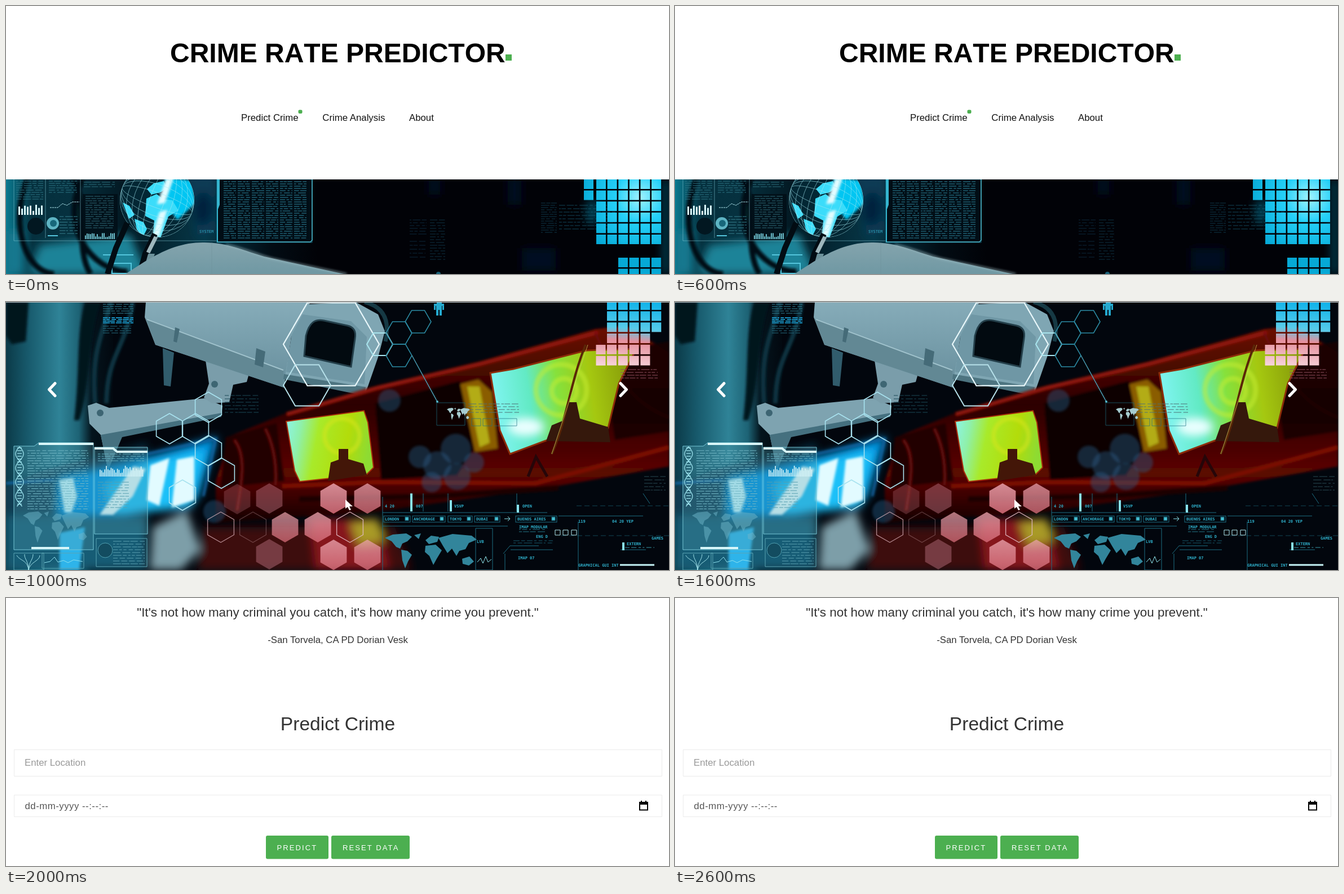
An HTML page that plays this animation: 1176 px wide and 476 px high, repeating every 3000 ms.

```html
<!DOCTYPE html>
<html lang="en">
<head>
<meta charset="utf-8">
<title>Crime Rate Predictor</title>
<style>
html, body { margin: 0; width: 100%; height: 100%; overflow: hidden; background: #fff; }
svg { display: block; width: 1176px; height: 476px; font-family: "Liberation Sans", Arial, sans-serif; }
.scene { display: none; }
.scene.on { display: inline; }
.title { font-size: 48px; font-weight: bold; font-kerning: none; }
.body { font-size: 16.8px; }
.mid { text-anchor: middle; }
.button { font-size: 13px; letter-spacing: 2.1px; fill: #fff; }
.hud { font: bold 7px "DejaVu Sans Mono", monospace; fill: #2fb0cb; }
</style>
</head>
<body>
<svg viewBox="0 0 1176 476">
<defs>
  <filter id="soft" x="-30%" y="-30%" width="160%" height="160%"><feGaussianBlur stdDeviation="2"/></filter>
  <filter id="blur" x="-50%" y="-50%" width="200%" height="200%"><feGaussianBlur stdDeviation="8"/></filter>
  <linearGradient id="wall">
    <stop offset="0" stop-color="#0b3a48"/><stop offset=".2" stop-color="#17596b"/>
    <stop offset=".5" stop-color="#2f8397"/><stop offset=".68" stop-color="#1d6375"/><stop offset=".8" stop-color="#04141d"/><stop offset="1" stop-color="#02080f"/>
  </linearGradient>
  <linearGradient id="room">
    <stop offset="0" stop-color="#0a7a90"/><stop offset=".04" stop-color="#05303e"/><stop offset=".1" stop-color="#06313f"/>
    <stop offset=".18" stop-color="#031822"/><stop offset=".3" stop-color="#063848"/><stop offset=".4" stop-color="#020c14"/><stop offset=".47" stop-color="#010207"/>
  </linearGradient>
  <linearGradient id="shell" x2="0" y2="1"><stop offset="0" stop-color="#86acb9"/><stop offset="1" stop-color="#678e9c"/></linearGradient>
  <linearGradient id="dome" x2="0" y2="1"><stop offset="0" stop-color="#84a4ad"/><stop offset="1" stop-color="#6f98a3"/></linearGradient>
  <linearGradient id="red" x2="0" y2="1">
    <stop offset="0" stop-color="#6d0d06"/><stop offset=".4" stop-color="#2c0303"/><stop offset=".75" stop-color="#5c0703"/><stop offset="1" stop-color="#140204"/>
  </linearGradient>
  <linearGradient id="lampA" y2=".15">
    <stop offset="0" stop-color="#8cf5ee"/><stop offset=".2" stop-color="#8ff0a8"/><stop offset=".4" stop-color="#a8ea2a"/><stop offset=".75" stop-color="#b3dc0a"/><stop offset="1" stop-color="#8edb32"/>
  </linearGradient>
  <linearGradient id="lampB" y2="-.1">
    <stop offset="0" stop-color="#7cf3ec"/><stop offset=".22" stop-color="#62eac4"/><stop offset=".42" stop-color="#86e13c"/><stop offset=".65" stop-color="#a5c810"/><stop offset="1" stop-color="#7f8f08"/>
  </linearGradient>
  <radialGradient id="glassTop" gradientUnits="userSpaceOnUse" cx="1125" cy="340" r="110">
    <stop offset="0" stop-color="#a0f3ff"/><stop offset=".4" stop-color="#25d0f8"/><stop offset="1" stop-color="#06a9d6"/>
  </radialGradient>
  <linearGradient id="glassLow" gradientUnits="userSpaceOnUse" x1="1100" y1="0" x2="1090" y2="114">
    <stop offset="0" stop-color="#12b4ea"/><stop offset=".4" stop-color="#57cbe9"/><stop offset=".6" stop-color="#e58f9c"/><stop offset="1" stop-color="#f6d3da"/>
  </linearGradient>
  <linearGradient id="pink" x2="0" y2="1"><stop offset="0" stop-color="#e9a3ad"/><stop offset="1" stop-color="#d96f7c"/></linearGradient>
  <clipPath id="strip"><rect y="308" width="1176" height="168"/></clipPath>
  <clipPath id="globeEdge"><circle cx="268" cy="345" r="66"/></clipPath>
  <path id="world" d="M0 8L14 2 38 0 48 6 40 14 31 18 27 27 20 24 12 14ZM29 29L40 31 48 38 41 50 36 62 31 48ZM52 3L64 0 60 10ZM72 12L82 4 96 6 93 15 78 19ZM72 22L90 20 101 30 92 45 86 56 79 40 71 33ZM95 8L120 1 154 4 163 11 149 17 143 28 132 31 127 40 119 27 111 35 103 22ZM137 45L150 41 158 50 149 57 138 54Z"/>
</defs>

<g class="scene on">
  <rect width="1176" height="476" fill="#fff"/>
  <text x="291" y="100" class="title">CRIME RATE PREDICTOR</text>
  <rect x="886" y="86" width="11" height="11" fill="#4caf50"/>
  <g class="body" fill="#111">
    <text x="417" y="204">Predict Crime</text><text x="561.3" y="204">Crime Analysis</text><text x="715" y="204">About</text>
  </g>
  <rect x="518.5" y="184.500" width="7" height="6.500" rx="2" fill="#4caf50"/>
  <g clip-path="url(#strip)">
    <rect y="308" width="1176" height="168" fill="url(#room)"/>
    <g filter="url(#blur)">
      <path d="M60 425L220 405 250 476H40Z" fill="#1b8398"/>
      <path d="M0 400H30V476H0Z" fill="#12788f"/>
      <path d="M320 300H372V400L340 410Z" fill="#083b55"/>
      <ellipse cx="350" cy="360" rx="16" ry="30" fill="#04213e"/>
      <path d="M750 305h20v30h-20ZM890 305h24v48h-24ZM915 430h60v40h-60Z" fill="#050c20"/>
      <path d="M1164 308h12v168h-12ZM1030 345h20v40h-20Z" fill="#064257"/>
    </g>
    <path d="M38 308C10 370 25 470 85 476M118 308C150 350 120 430 150 476M135 308C95 390 150 470 215 472" fill="none" stroke="#020c13" stroke-width="10" filter="url(#soft)"/>
    <rect x="136" y="334" width="62" height="82" fill="#020f17" opacity=".85"/>
    <g id="leftScreens">
      <path d="M14 308V417H543M70 308V412M132 308V416" fill="none" stroke="#7cc3cf" stroke-opacity=".6"/>
      <path d="M78 358h14l8-7 8 3 10-6h12" fill="none" stroke="#b6edf4" stroke-dasharray="3 1"/>
      <circle cx="53" cy="391" r="15" fill="#021721"/><circle cx="83" cy="386" r="11" fill="#5eb4c3"/><circle cx="84" cy="386" r="6" fill="#17677a"/>
      <path d="M74 408h18M172 442h54M188 457h34v18h-34Z" fill="none" stroke="#55c5dc" stroke-width="2"/>
    </g>
    <circle cx="268" cy="345" r="66" fill="#032734"/>
    <g clip-path="url(#globeEdge)">
      <path d="M282 304L330 310 336 350 304 380 282 350Z" fill="#06c6f2" filter="url(#soft)"/>
      <path d="M249 342l18-8 12 9 16 2 11 18-18 11-14 38-13-7 2-24-16-8ZM250 325l12-10 18-4 6 12-12 8-16 4ZM207 349l12 6 9 16-10 7ZM228 378l16 6 6 12-7 14-11-13Z" fill="#3bdcfa"/>
      <path d="M284 306L298 304 282 350 268 352ZM272 366L286 362 272 410 259 410Z" fill="#e1fcff" filter="url(#soft)"/>
      <g id="mesh" fill="none" stroke="#a5e9f2" stroke-width=".7" opacity=".75"/>
    </g>
    <path d="M246 440L264 440 252 476H238Z" fill="#6d929b"/><path d="M264 405L247 440 237 476M215 385L195 430 180 476" fill="none" stroke="#020c13" stroke-width="10"/>
    <path d="M252 438L266 410" stroke="#9eb7bd" stroke-width="7"/>
    <path d="M374 308H543V420H374Z" fill="#010d15" stroke="#17647a"/>
    <path d="M374 308h5v45l-3 8v58h-2Z" fill="#35b5cf"/>
    <path d="M374 419H540L543 416V308" fill="none" stroke="#4fb9cd" stroke-width="1.5"/>
    <g id="codePanel"/>
    <text x="343" y="403" class="hud" opacity=".7">SYSTEM</text>
    <path d="M212 476C260 444 300 419 352 420 392 420 424 435 458 445L604 477Z" fill="url(#dome)"/>
    <path d="M390 424C430 432 450 444 474 449L604 476" fill="none" stroke="#a3c2c9" stroke-width="2" filter="url(#soft)"/>
    <path d="M365 420V476" stroke="#6f8f98" opacity=".5"/>
    <circle cx="767" cy="476" r="4" fill="#176078"/>
    <g id="farPanels" opacity=".65"/>
    <g id="glassA" fill="url(#glassTop)"/>
  </g>
</g>

<g class="scene">
  <rect width="1176" height="476" fill="#02060d"/>
  <rect width="190" height="476" fill="url(#wall)"/>
  <path d="M0 0H40L35 70 10 75 0 60ZM140 0h28C146 60 150 150 130 210h-9C132 120 124 60 140 0Z" fill="#04131c" filter="url(#soft)"/>
  <path d="M186 0C175 50 150 80 158 180M225 0C210 90 180 90 178 180" fill="none" stroke="#0c3443" stroke-width="8" filter="url(#soft)"/>
  <g filter="url(#blur)">
    <path d="M0 330C80 280 140 290 250 250V476H0Z" fill="#0a3a52" opacity=".85"/>
    <path d="M0 380L250 385V476H0Z" fill="#175c75"/>
  </g>

  <path d="M145 184L160 179 183 188 352 171 384 184 382 202 206 237 181 299 168 236 148 216Z" fill="#7ea3b0"/>
  <path d="M168 236L382 197V204L206 240 181 299Z" fill="#45707f"/>
  <circle cx="167" cy="197" r="6" fill="#3d6573"/>
  <path d="M354 104L432 124 427 142 403 147 396 178 365 180 351 170 360 145Z" fill="#7a9daa"/>
  <circle cx="370" cy="146" r="6" fill="#3e6673"/>
  <path d="M278 82L298 90 292 150 280 148Z" fill="#315c6c"/>
  <path d="M248 0H540L506 62 493 152 265 76 246 27Z" fill="url(#shell)"/>
  <path d="M248 30L492 120 493 152 265 76Z" fill="#628894"/>
  <path d="M250 31L492 121" stroke="#a0c2cc" stroke-width="2"/>
  <path d="M300 45l8 3-5 24-6-2ZM444 82l16 6-4 28-15-5Z" fill="#456b78"/>
  <path d="M507 58L537 4 620 0 660 22 672 52 660 98 637 164 495 132Z" fill="#7fa6b3"/>
  <path d="M507 58L526 22 612 34 640 62 636 146 497 124Z" fill="#6f97a5"/>
  <path d="M532 60C538 36 548 30 564 33L606 42C618 45 621 54 619 65L612 115 529 96Z" fill="#020a10" stroke="#243f4a" stroke-width="3"/>
  <path d="M636 0C668 8 682 30 673 70" fill="none" stroke="#163944" stroke-width="7"/>
  <path d="M493 128L638 151 634 166 492 137Z" fill="#4d7480"/>

  <g filter="url(#soft)">
    <path d="M372 318L398 238 500 196 645 152 838 106 1045 48 1100 42 1176 90V292L960 330 660 372 372 392Z" fill="url(#red)"/>
    <path d="M655 180L805 140 830 262 800 308 665 316Z" fill="#070306"/>
    <path d="M390 240L480 215 494 318 380 330Z" fill="#220406"/>
    <path d="M498 199L660 152 840 110 1050 54" fill="none" stroke="#8e1408" stroke-width="7"/>
    <path d="M490 327L660 320 940 322 1176 258" fill="none" stroke="#7d0d06" stroke-width="7"/>
    <path d="M520 350L760 345 980 330" fill="none" stroke="#1b0204" stroke-width="10"/>
    <path d="M405 245C425 270 420 310 410 370M460 225C478 260 480 300 478 325M1045 55C1080 130 1110 180 1176 205" fill="none" stroke="#6b0d09" stroke-width="4"/>
    <path d="M1055 90L1176 70V230L1080 245Z" fill="#140205" opacity=".85"/>
    <path d="M806 146L838 138 862 160 872 260 832 266Z" fill="#8a5d05"/><path d="M818 150L840 150 858 250 840 258Z" fill="#b3ac12"/>
  </g>
  <path d="M497 212L635 193 642 214 652 294 640 306 521 319 512 300Z" fill="url(#lampA)" stroke="#a62c0a" stroke-width="2"/>
  <ellipse cx="596" cy="238" rx="31" ry="31" fill="none" stroke="#d8e51a" stroke-width="8" opacity=".5" filter="url(#soft)"/>
  <path d="M571 318L576 285 590 280 590 261H607V279L634 287 640 307Z" fill="#431608"/>
  <path d="M859 126L900 119 1030 86 1118 83 1087 145 1068 224 958 246 894 270 876 228Z" fill="url(#lampB)" stroke="#8c2c09" stroke-width="3"/>
  <g fill="none" stroke="#c7ed32" stroke-width="9" opacity=".5" filter="url(#soft)"><circle cx="985" cy="156" r="45"/><circle cx="990" cy="158" r="22"/></g>
  <ellipse cx="922" cy="222" rx="32" ry="16" fill="#eaffff" filter="url(#blur)"/>
  <path d="M958 247L968 219 990 210 996 178H1012L1018 207 1068 222 1072 249Z" fill="#35180c"/>
  <path d="M1028 76C1000 145 995 210 968 270" fill="none" stroke="#5a2607" stroke-width="4"/>
  <path d="M1032 76L968 270" stroke="#cbd463" opacity=".7"/>
  <path d="M926 310L940 275 960 310" fill="none" stroke="#260609" stroke-width="5"/>

  <g filter="url(#blur)">
    <path d="M350 400H690L720 476H340Z" fill="#3d070a"/>
    <path d="M540 385H660L680 476H550Z" fill="#86131a"/>
    <path d="M610 392L660 385 670 425 625 432Z" fill="#a89a28"/>
    <path d="M92 312L250 275 375 239 340 350 215 380 90 382Z" fill="#0594e2"/>
    <path d="M175 325L250 285 353 262 330 365 190 378Z" fill="#1cc0f8"/>
    <path d="M260 400L320 370 345 440 310 476H255Z" fill="#7d9ea8"/>
  </g>
  <g filter="url(#soft)">
    <path d="M94 316L119 312 126 346 116 374 104 374Z" fill="#c5f6ff"/>
    <path d="M166 378L226 292 248 296 225 345 190 378ZM256 290L290 277 272 362 249 352ZM303 280L334 274 334 352 294 365Z" fill="#e2fbff"/>
    <path d="M0 322L85 316M250 270L372 243 350 345" fill="none" stroke="#1267a8" stroke-width="4"/>
    <path d="M95 410L140 400 130 476H95Z" fill="#2fb4ea"/>
  </g>
  <g id="bokeh" fill="#2a638c" filter="url(#soft)"/>
  <g id="lowPanels">
    <path d="M14 440V256H50L58 250H155V440ZM157 412V258H251V412Z" fill="#4f98aa" fill-opacity=".3" stroke="#76c7d6"/>
    <path d="M58 252H155M157 260H190L197 266H251M45 437H112" fill="none" stroke="#d8f7fa" stroke-width="4"/>
    <path d="M14 446H67V476H14ZM64 446H138V473H64ZM160 420H250V470H160Z" fill="none" stroke="#5aa4b3"/>
    <path d="M40 476C38 458 25 460 19 450M40 476C40 460 32 456 33 448M40 476C41 460 48 458 48 448M40 476C42 462 60 460 60 450" fill="none" stroke="#9fe1e9"/>
    <path d="M68 463l10-2 8-8 6 9 10-3 8 4 10-5 16 3" fill="none" stroke="#8de0ee"/>
    <circle cx="176" cy="441" r="13" fill="#134c60" stroke="#4f9eaf"/>
    <use href="#world" transform="translate(30 372) scale(.72 .9)" fill="#6fb5c9" opacity=".5"/>
  </g>
  <g id="helix" fill="none" stroke="#9de4ef" stroke-width="1.3"/>
  <g id="hexes" fill="none"/>
  <path d="M720 95L765 177" stroke="#4a9cb2" stroke-width="1.5"/><circle cx="765" cy="177" r="2" fill="#54bacd"/>
  <path d="M764 0h9v3h4v11h-3V7h-1v17h-4V14h-2v10h-4V7h-1v7h-3V3h5Z" fill="#25a9cf"/>
  <g id="glassB" fill="url(#glassLow)"/>

  <g id="hud" fill="none" stroke="#1d6f84">
    <path d="M668 346V476M668 374H960M668 398H890M740 340v32M784 340v32M906 340v32M882 447L894 433H945M885 447V476M895 440H970M980 380H1130M1015 390V476M1130 340l12 18M1090 440h45M833 402h30v74h-30Z"/>
    <path d="M719 340v32M789 352v20M908 360v14M1095 427v14" stroke="#89e3ee" stroke-width="4"/>
    <path d="M884 385h10l-4-4m4 4l-4 4" stroke="#8ee6ef"/>
    <path d="M1012 362H1176M985 415H1176" stroke-dasharray="9 5" opacity=".6"/>
    <path d="M1089 467H1150" stroke="#c6f4f7" stroke-width="3"/>
    <path d="M836 462l6-7 4 9 5-12 4 10 6-5" stroke="#92e7ef"/>
    <path d="M764 179h50v40h-50ZM826 207h16v13h-16ZM846 207h16v13h-16ZM866 207h40v13h-40" opacity=".7"/>
    <path d="M974 405h9v9h-9ZM988 405h9v9h-9ZM1003 405h9v9h-9Z" stroke="#b7edf2"/>
    <g id="cityTabs"/>
  </g>
  <use href="#world" transform="translate(672 411)" fill="#32859b"/>
  <use href="#world" transform="translate(782 188) scale(.25 .35)" fill="#a7cdd1"/>
  <g class="hud" id="hudText"/>
  <path d="M87 144.500L76.500 155.500 87 166.500M1090 144.500L1100.500 155.500 1090 166.500" fill="none" stroke="#fff" stroke-width="5" stroke-linecap="round" stroke-linejoin="round"/>
  <path d="M602 351V367L606 364 609 370 612 369 609 363H615Z" fill="#fff"/>
  <path d="M0 .5H1176" stroke="#b9c0c2"/>
</g>

<g class="scene">
  <rect width="1176" height="476" fill="#fff"/>
  <g class="mid" fill="#333">
    <text x="588.5" y="33" font-size="22.4">"It's not how many criminal you catch, it's how many crime you prevent."</text>
    <text x="588.5" y="80" class="body">-San Torvela, CA PD Dorian Vesk</text>
    <text x="588.5" y="235" font-size="33.6">Predict Crime</text>
  </g>
  <path d="M14.500 269.500H1163.500V316.500H14.500ZM14.500 350H1163.500V388.500H14.500Z" fill="none" stroke="#ebebeb"/>
  <text x="33" y="298" class="body" fill="#999">Enter Location</text>
  <text x="33.500" y="375" class="body" fill="#555" letter-spacing=".5">dd-mm-yyyy --:--:--</text>
  <path d="M1124 363H1138V376.500H1124Z" fill="none" stroke="#000" stroke-width="2"/>
  <path d="M1123 362h16v5h-16ZM1126 360h2v3h-2ZM1134 360h2v3h-2Z"/>
  <rect x="461" y="422" width="111" height="41.500" rx="3" fill="#4caf50"/>
  <rect x="577" y="422" width="139" height="41.500" rx="3" fill="#4caf50"/>
  <text x="480.5" y="447.500" class="button">PREDICT</text><text x="597" y="447.500" class="button">RESET DATA</text>
</g>
</svg>

<script>
const $ = id => document.getElementById(id);
const add = (id, tag, attrs, text = '') => {
  const el = document.createElementNS('http://www.w3.org/2000/svg', tag);
  for (const key in attrs) el.setAttribute(key, attrs[key]);
  el.textContent = text;
  $(id).append(el);
};

let seed = 7;
const random = () => (seed = seed * 16807 % 2147483647) / 2147483647;

// Rows of broken strokes that read as tiny print.
function print(id, x, y, w, h, step, stroke, weight = 1) {
  let d = '';
  for (let row = y; row < y + h; row += step)
    for (let col = x; col < x + w;) {
      const end = Math.min(x + w, col + 3 + random() * 12);
      d += `M${col.toFixed(1)} ${row}H${end.toFixed(1)}`;
      col = end + 1 + random() * 3;
    }
  add(id, 'path', { d, stroke, fill: 'none', 'stroke-width': weight });
}

function bars(id, x, base, count, step, height, fill) {
  for (let i = 0; i < count; i++) {
    const h = height * (.3 + .7 * random());
    add(id, 'rect', { x: x + i * step, y: base - h, width: step * .6, height: h, fill });
  }
}

function cells(id, x, y, cols, rows, pitch) {
  for (let c = 0; c < cols; c++) for (let r = 0; r < rows; r++)
    add(id, 'rect', { x: x + c * pitch, y: y + r * pitch, width: 17, height: 17 });
}

function hex(cx, cy, r, turn, attrs) {
  const points = Array.from({ length: 6 }, (_, i) => {
    const a = (i * 60 + turn) * Math.PI / 180;
    return [cx + r * Math.cos(a), cy + r * Math.sin(a)].map(v => v.toFixed(1));
  }).join(' ');
  add('hexes', 'polygon', { points, ...attrs });
}

// Header picture
print('leftScreens', 18, 311, 48, 36, 4, '#2c7484');
print('leftScreens', 76, 311, 50, 22, 4, '#2c7484');
print('leftScreens', 138, 313, 55, 12, 4, '#2a6c7b');
print('leftScreens', 141, 338, 50, 60, 4, '#2f6a78');
print('leftScreens', 95, 374, 32, 35, 5, '#37808f');
bars('leftScreens', 22, 371, 9, 5, 19, '#d9f7fa');
bars('leftScreens', 140, 414, 18, 3, 11, '#79d0de');
for (const k of [.2, .42, .62, .8, 1]) {
  add('mesh', 'ellipse', { cx: 268, cy: 345, rx: 66 * k, ry: 66, transform: 'rotate(20 268 345)' });
  add('mesh', 'ellipse', { cx: 268, cy: 345, rx: 66, ry: 66 * k, transform: 'rotate(20 268 345)' });
}
for (let x = 386; x < 530; x += 25) print('codePanel', x, 312, 22, 102, 4, '#1f5f72', 1.4);
print('farPanels', 716, 380, 30, 30, 5, '#123b55');
print('farPanels', 752, 380, 27, 72, 5, '#174b63');
print('farPanels', 716, 418, 28, 30, 7, '#123b55');
print('farPanels', 949, 350, 28, 55, 4, '#17536c');
print('farPanels', 981, 354, 100, 48, 6, '#1c6a80');
cells('glassA', 1025, 308, 1, 2, 19.6);
cells('glassA', 1047, 308, 6, 6, 19.6);
cells('glassA', 1086, 447, 4, 2, 19.6);

// Camera picture
for (const [cx, cy, r] of [[734, 275, 20], [798, 261, 27], [765, 290, 25], [800, 310, 24], [755, 320, 18], [680, 175, 20], [830, 285, 18], [370, 372, 20]])
  add('bokeh', 'circle', { cx, cy, r, opacity: .4 });
print('lowPanels', 38, 264, 108, 104, 4.5, '#72b7c5');
print('lowPanels', 163, 270, 82, 13, 4, '#68b6c6');
print('lowPanels', 163, 320, 55, 50, 5, '#579fb0');
print('lowPanels', 172, 4, 54, 18, 4, '#31859a');
print('lowPanels', 172, 28, 54, 10, 3, '#188dbb', 2);
print('lowPanels', 172, 43, 50, 14, 4, '#246d80');
print('lowPanels', 190, 425, 56, 42, 5, '#5a9fb0');
print('lowPanels', 388, 166, 60, 36, 6, '#1b4957');
bars('lowPanels', 166, 310, 28, 2.8, 20, '#d6f4f8');
for (const phase of [0, Math.PI]) {
  const points = Array.from({ length: 54 }, (_, i) => `${(24 + 7 * Math.sin(i / 4 + phase)).toFixed(1)},${257 + i * 2}`).join(' ');
  add('helix', 'polyline', { points });
}
for (let y = 259; y < 364; y += 5) add('helix', 'path', { d: `M20 ${y}h8` });

hex(577, 75, 85, 0, { stroke: '#e8f7fa', 'stroke-width': 2.2 });
hex(534, 148, 42, 0, { stroke: '#b7e1ea', 'stroke-width': 2 });
hex(663, 75, 23, 0, { stroke: '#a9e5ee', 'stroke-width': 2 });
for (const [x, y] of [[697, 55], [697, 95], [731, 35]]) hex(x, y, 23, 0, { stroke: '#2d8ca5', 'stroke-width': 1.5 });
for (const [x, y] of [[359, 187], [290, 225], [336, 225], [359, 264], [382, 304], [313, 343]])
  hex(x, y, 27, 30, { stroke: '#a8e2ef', 'stroke-width': 1.6 });
for (const [x, y, opacity] of [[410, 350, .32], [467, 349, .5], [581, 349, .85], [641, 349, .75], [495, 400, .72], [553, 400, .78], [467, 448, .5], [581, 449, .8], [641, 449, .75]])
  hex(x, y, 27, 30, { fill: x < 480 ? '#b06a78' : 'url(#pink)', opacity });
for (const [x, opacity] of [[381, .7], [438, .3], [610, .9]]) hex(x, 400, 27, 30, { stroke: '#e1b8c1', 'stroke-width': 1.4, opacity });

cells('glassB', 1066, -3, 5, 1, 19.8);
cells('glassB', 1066, 16.5, 5, 2, 19.8);
cells('glassB', 1066, 56, 4, 3, 19.8);
cells('glassB', 1046.5, 76, 1, 2, 19.8);
print('lowPanels', 1090, 120, 66, 16, 5, '#8e5060');
print('hud', 820, 181, 90, 20, 5, '#4f7277');
print('hud', 910, 404, 46, 6, 4, '#25798b');
print('hud', 1098, 436, 52, 3, 3, '#3b98a8');
print('hud', 1132, 310, 38, 30, 6, '#294853');
print('hud', 900, 424, 70, 5, 4, '#17596c');

for (const [x, w] of [[670, 47], [721, 58], [784, 43], [831, 45], [904, 73]]) {
  add('cityTabs', 'rect', { x, y: 380, width: w, height: 11 });
  add('cityTabs', 'rect', { x: x + w - 9, y: 382, width: 6, height: 6, fill: '#45bfd1' });
}
for (const [x, y, label] of [
  [672, 365, '4 20'], [727, 365, '007'], [795, 365, 'VSVP'], [916, 365, 'OPEN'],
  [672, 388, 'LONDON'], [723, 388, 'ANCHORAGE'], [787, 388, 'TOKYO'], [834, 388, 'DUBAI'], [907, 388, 'BUENOS AIRES'],
  [910, 402, 'IMAP MODULAR'], [940, 419, 'ENG D'], [908, 457, 'IMAP 07'], [835, 428, 'LVB'],
  [1015, 392, '119'], [1075, 392, '04  20   YEP'], [1145, 422, 'GAMES'], [1101, 432, 'EXTERN'], [1015, 470, 'GRAPHICAL GUI INT']
]) add('hudText', 'text', { x, y }, label);

const scenes = document.querySelectorAll('.scene');
function draw() {
  const current = Math.floor(performance.now() % 3000 / 1000);
  scenes.forEach((scene, i) => scene.classList.toggle('on', i === current));
  requestAnimationFrame(draw);
}
draw();
</script>
</body>
</html>
```
